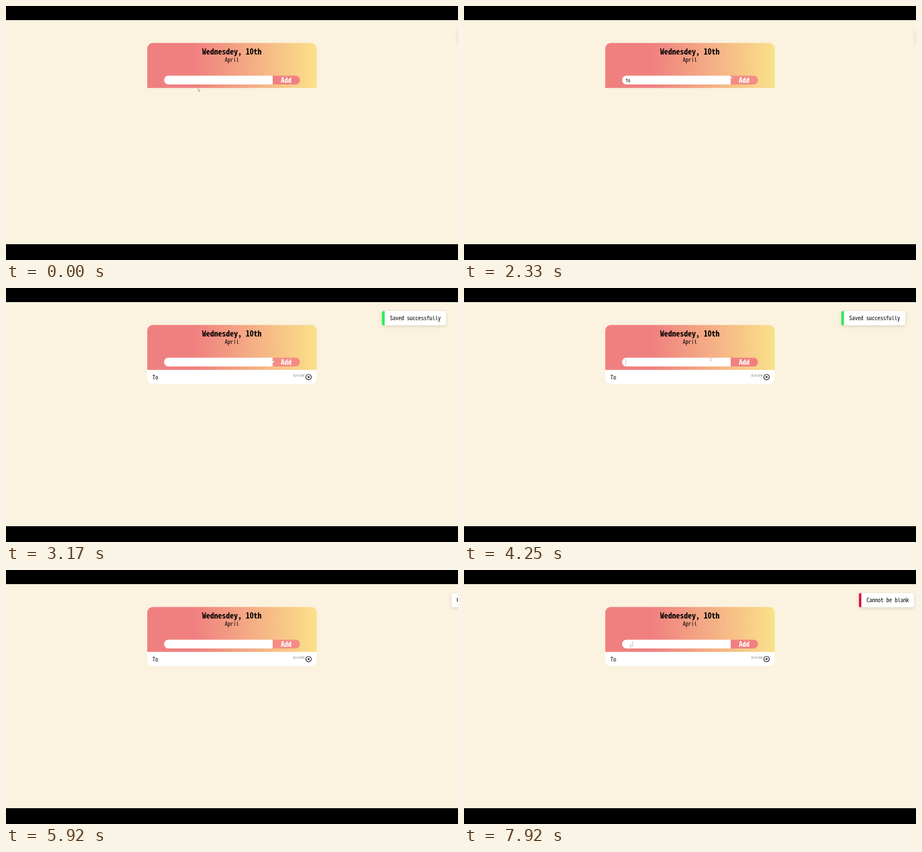
An HTML page for the animation above (8000 ms loop, 800 by 450 pixels).

```html
<!DOCTYPE html>
<html lang="en">
<head>
<meta charset="utf-8">
<title>To-do list</title>
<style>
  html, body { margin: 0; width: 100%; height: 100%; overflow: hidden; background: #000; }
  svg { display: block; width: 800px; height: 450px; }
  text {
    font-family: "Noto Sans Mono CJK JP", "Noto Sans Mono", "DejaVu Sans Mono", monospace;
    font-size: calc(var(--s) * var(--fit, 1) * 1px);
    font-weight: 500;
    white-space: pre;
  }
  .bold { font-weight: 700; }
  .mid { text-anchor: middle; }
  #toast { filter: drop-shadow(0 2px 3px rgba(0, 0, 0, .13)); }
</style>
</head>
<body>
<svg viewBox="0 0 800 450">
  <defs>
    <linearGradient id="warm">
      <stop offset=".28" stop-color="#f08080"/>
      <stop offset="1" stop-color="#fae18a"/>
    </linearGradient>
    <clipPath id="round"><rect x="668" y="41" width="114" height="25" rx="3" id="clipBox"/></clipPath>
  </defs>
  <rect y="25" width="800" height="397" fill="#fbf2df"/>

  <path d="M250 145.3V75.5a10 10 0 0 1 10-10H540a10 10 0 0 1 10 10V145.3Z" fill="url(#warm)"/>
  <text class="bold mid" x="399.7" y="86" style="--s:14">Wednesdey, 10th</text>
  <text class="mid" x="399.7" y="99.3" style="--s:10">April</text>
  <path d="M472 123.5H287.500a7.500 7.500 0 0 0 0 15.500H472Z" fill="#fff"/>
  <path id="button" d="M472 123.500H512.500a7.500 7.500 0 0 1 0 15.500H472Z"/>
  <text class="bold mid" x="496" y="136" fill="#fff" style="--s:12.500">Add</text>
  <text id="field" x="286" y="134.800" style="--s:8"></text>
  <path id="caret" d="M0 126.500V136.500" stroke="#999" stroke-width=".7"/>

  <g id="item">
    <path d="M250 145.300H550V160a10 10 0 0 1-10 10H260a10 10 0 0 1-10-10Z" fill="#fff"/>
    <text x="259.200" y="161.600" style="--s:10">To</text>
    <text x="508" y="157.300" fill="#666" style="--s:4.500">10/4/2024</text>
    <g fill="none" stroke="#111" stroke-width="1.200">
      <circle cx="535.500" cy="157.800" r="4.800"/>
      <path d="M533.900 156.200l3.200 3.200m0-3.200l-3.200 3.200"/>
    </g>
  </g>

  <g id="toast">
    <g clip-path="url(#round)">
      <rect id="panel" y="41" height="25" fill="#fff"/>
      <rect id="bar" y="41" height="25"/>
    </g>
    <text id="message" y="57.400" style="--s:10"></text>
  </g>

  <g id="pointer" stroke-width=".6">
    <path id="arrow" d="M0 0V5L1.300 4L2.200 5.700L3 5.300L2.200 3.700H3.700Z" fill="#fff" stroke="#777"/>
    <path id="beam" d="M-1 -2.300H1M0 -2.300V2.300M-1 2.300H1" fill="none" stroke="#888"/>
    <path id="hand" d="M-.8 -3V0L-2 -.2L-.8 2.600H2L2.600 -.5L.4 -1V-3Z" fill="#fff" stroke="#888" stroke-width=".4"/>
  </g>
  <rect width="800" height="25"/>
  <rect y="422" width="800" height="28"/>
</svg>
<script>
const LOOP = 8000, FADE = 500, STAY = 1995;
const $ = id => document.getElementById(id);
const set = (id, attrs) => { for (const k in attrs) $(id).setAttribute(k, attrs[k]); };
const show = (id, on) => set(id, { visibility: on ? 'visible' : 'hidden' });

// Size the type so one character is half its nominal size wide.
const pen = document.createElement('canvas').getContext('2d');
pen.font = '500 100px ' + getComputedStyle($('field')).fontFamily;
document.documentElement.style.setProperty('--fit', 50 / pen.measureText('o').width);

// Pointer path: time, x, y
const path = [
  [80, 340, 146], [330, 308, 131], [1830, 308, 131], [2330, 472, 126],
  [2580, 500, 131], [2830, 500, 131], [3170, 472.5, 130], [3480, 421, 130],
  [3670, 437, 127], [4500, 437, 127], [5000, 505, 135], [5850, 505, 135],
  [6330, 427, 130], [6500, 437, 128], [6750, 437, 128], [7500, 295, 135]
];
// Input states: time, text, focused
const typing = [
  [0, '', false], [670, '', true], [1000, 'T', true], [1420, 'To', true], [2670, '', false],
  [3920, '', true], [5480, '', false], [7330, '', true],
  [7580, ' ', true], [7710, '  ', true], [7840, '   ', true]
];
const toasts = [
  { at: 0, text: '', color: '#fff' },
  { at: 2690, text: 'Saved successfully', color: '#2eec5c' },
  { at: 5720, text: 'Cannot be blank', color: '#dc143c' }
];

const bezier = (s, a, b) => 3 * (1 - s) ** 2 * s * a + 3 * (1 - s) * s * s * b + s ** 3;

function ease(t) {
  if (t <= 0) return 0;
  if (t >= 1) return 1;
  let lo = 0, hi = 1;
  for (let i = 0; i < 24; i++) {
    const mid = (lo + hi) / 2;
    if (bezier(mid, .68, .265) < t) lo = mid; else hi = mid;
  }
  return bezier(lo, -.55, 1.35);
}

function pointerAt(t) {
  const i = path.findIndex(p => p[0] > t);
  if (i === 0) return path[0].slice(1);
  if (i < 0) return path[path.length - 1].slice(1);
  const [a, b] = [path[i - 1], path[i]], k = (t - a[0]) / (b[0] - a[0]);
  return [1, 2].map(n => a[n] + (b[n] - a[n]) * k);
}

function drawInput(t) {
  const [since, text, focused] = typing.findLast(s => s[0] <= t);
  $('field').textContent = text;
  set('caret', { transform: `translate(${286.3 + 4 * text.length})` });
  show('caret', focused && (t - since) % 1000 < 500);
}

function drawPointer(t) {
  const [x, y] = pointerAt(t);
  const inRow = y > 123 && y < 139;
  const onButton = inRow && x >= 472 && x < 520;
  const onField = inRow && x >= 280 && x < 472;
  set('pointer', { transform: `translate(${x} ${y})` });
  set('button', { fill: onButton ? '#f48c84' : '#f08080' });
  show('hand', onButton);
  show('beam', onField);
  show('arrow', !onButton && !onField);
}

function drawToast(t) {
  const { at, text, color } = toasts.findLast(n => n.at <= t);
  const open = text ? ease((t - at) / FADE) - ease((t - at - STAY) / FADE) : 0;
  const bar = open > .5 ? 5 * open : 0;
  const width = text.length * 5 + 18.5 + bar;
  const x = 781 - width + (width + 19) * (1 - open);
  set('panel', { x, width });
  set('clipBox', { x, width });
  set('bar', { x, width: bar, fill: color });
  set('message', { x: x + bar + 9.2 });
  $('message').textContent = text;
}

function frame(now) {
  const t = now % LOOP;
  drawInput(t);
  drawPointer(t);
  drawToast(t);
  show('item', t >= 2670);
  requestAnimationFrame(frame);
}
frame(0);
</script>
</body>
</html>
```
